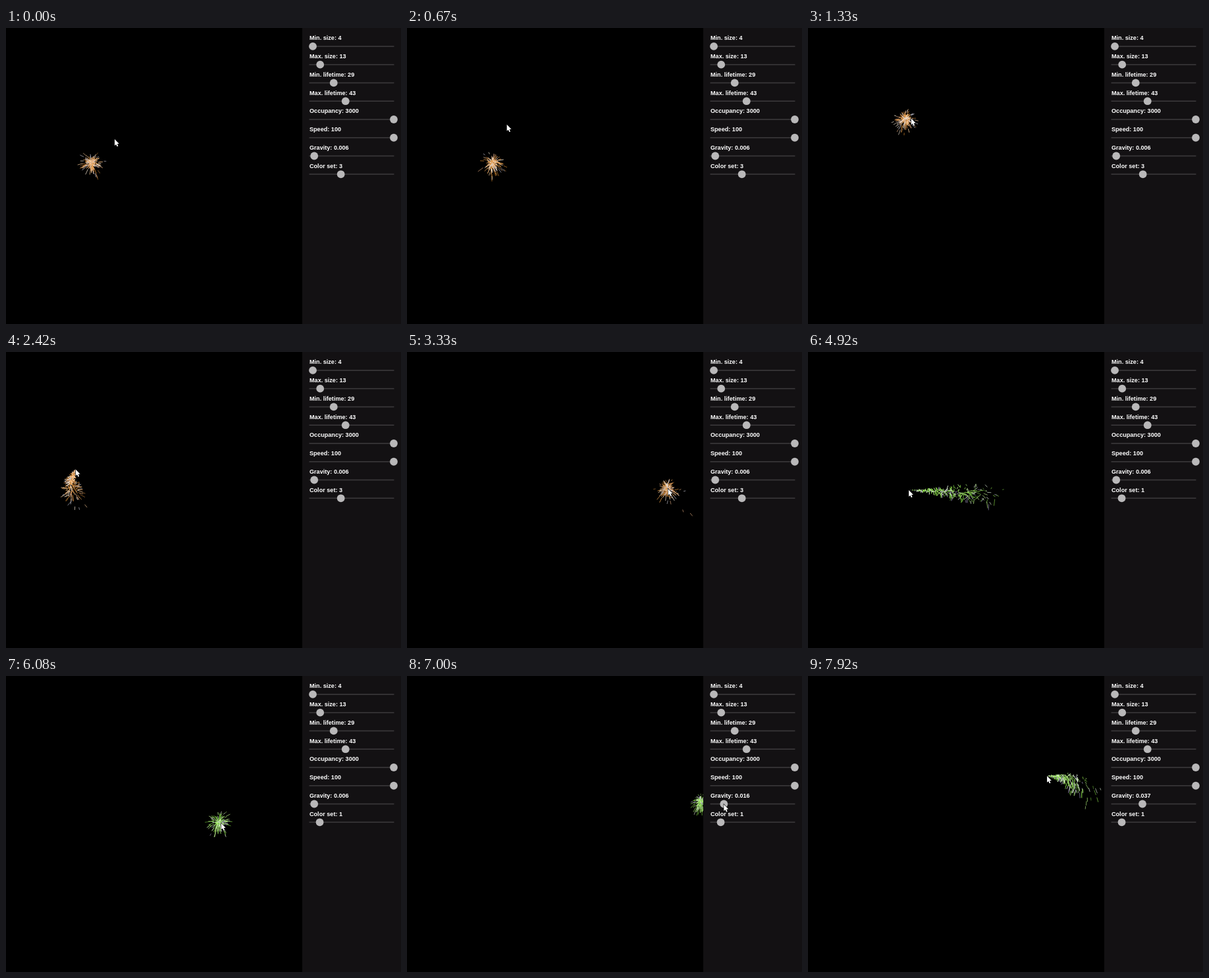
Recreate the animation shown at these times as an HTML page with a canvas. Size 600x450 px, loop 8 s.

```html
<!DOCTYPE html>
<html lang="en">
<head>
<meta charset="utf-8">
<title>Particle fountain</title>
<style>
html, body { margin: 0; width: 100%; height: 100%; overflow: hidden; background: #000; }
canvas { display: block; }
</style>
</head>
<body>
<canvas id="stage" width="600" height="450"></canvas>
<script>
const ctx = document.getElementById('stage').getContext('2d');
const LOOP = 8000;
const STEP = 1000 / 12;    // the picture refreshes 12 times a second
const TICK = 1 / 120;      // simulation step in seconds
const RATE = 7;            // particles born per tick
const LIFE = [29, 43];
const SIZE = [4, 13];
const SPEED = [0.25, 0.62];
const TRACK = { x: 460.5, width: 128.5 };

const WARM = ['#f0a550', '#ffcf9a', '#d98a2e', '#c9c9d6', '#fff0dc', '#b07434', '#eab183'];
const LIME = ['#8fe04a', '#b4f57c', '#6fb83a', '#e6f5de', '#9a90b8', '#c4fa92', '#7ccb42'];

const mix = (a, b, k) => a + (b - a) * k;

function rand(seed) {
  let h = Math.imul(seed ^ 0x9e3779b9, 0x85ebca6b);
  h = Math.imul(h ^ (h >>> 13), 0xc2b2ae35);
  h = Math.imul(h ^ (h >>> 16), 0x27d4eb2f);
  return ((h ^ (h >>> 15)) >>> 0) / 4294967296;
}

// The pointer's moves, chained: each runs until a time (s) to a point,
// bulging sideways by `bend` pixels on the way.
const moves = [];
let pen = { t: 0, x: 165, y: 169 };
function move(kind, t, x, y, bend = 0) {
  const to = { t, x, y };
  moves.push({ kind, from: pen, to, bend });
  pen = to;
}

move('hover', 0.9, 147, 139);
move('emit', 1.2, 149, 138);
move('emit', 1.7, 226, 132);
move('emit', 1.83, 292, 150);
move('emit', 2.04, 110, 224, -60);
move('emit', 2.42, 106, 178, -9);
move('emit', 2.75, 480, 190, -27);
move('emit', 2.95, 395, 208, -50);
move('emit', 3.33, 397, 208);
move('emit', 3.6, 398, 229);
move('hover', 3.95, 509, 223);
move('color', 4.25, 477, 223);
move('hover', 4.5, 310, 217);
move('emit', 4.917, 153, 210);
move('emit', 5.1, 70, 225);
move('emit', 5.42, 415, 200, 45);
move('emit', 5.66, 323, 222, 40);
move('emit', 5.98, 325, 223);
move('emit', 6.1, 336, 227);
move('emit', 6.55, 447, 190, -15);
move('hover', 6.7, 526, 186);
move('hover', 6.85, 468, 195);
move('gravity', 7.3, 508, 196);
move('hover', 7.42, 508, 196);
move('hover', 7.54, 432, 152);
move('emit', 7.95, 357, 152);

function follow({ from, to, bend }, t) {
  const u = Math.min(1, (t - from.t) / (to.t - from.t));
  const dx = to.x - from.x, dy = to.y - from.y;
  const side = bend * Math.sin(Math.PI * u) / (Math.hypot(dx, dy) || 1);
  return [from.x + dx * u - dy * side, from.y + dy * u + dx * side];
}

function stateAt(t) {
  const state = { cursor: [165, 169], emitter: [130, 205], gravity: 0.006, color: 3 };
  for (const stroke of moves) {
    if (t < stroke.from.t) break;
    const pos = follow(stroke, t);
    const value = (pos[0] - TRACK.x) / TRACK.width;
    state.cursor = pos;
    if (stroke.kind === 'emit') state.emitter = pos;
    if (stroke.kind === 'color') state.color = Math.round(value * 8);
    if (stroke.kind === 'gravity') state.gravity = value * 0.1;
  }
  return state;
}

function drawParticle([x, y], seed, age, gravity, colors) {
  const r = n => rand(seed * 8 + n);
  const life = mix(...LIFE, r(0));
  if (age > life) return;
  const angle = r(1) * Math.PI * 2;
  const speed = mix(...SPEED, r(2));
  const k = age / life;
  const length = mix(...SIZE, r(3)) * (1 - 0.3 * k);
  const fall = Math.hypot(speed, gravity * age);
  const pointAt = a => [
    x + Math.cos(angle) * speed * a,
    y + Math.sin(angle) * speed * a + gravity * a * a / 2,
  ];
  ctx.globalAlpha = 1 - 0.4 * k * k;
  ctx.strokeStyle = colors[Math.floor(r(4) * colors.length)];
  ctx.beginPath();
  ctx.moveTo(...pointAt(Math.max(0, age - length / fall)));
  ctx.lineTo(...pointAt(age));
  ctx.stroke();
}

function drawParticles(t, gravity) {
  const now = Math.floor(t / TICK);
  ctx.lineWidth = 1;
  for (let age = LIFE[1]; age >= 0; age--) {
    const birth = now - age;
    const { emitter, color } = stateAt(birth * TICK);
    const colors = color === 3 ? WARM : LIME;
    for (let i = 0; i < RATE; i++) {
      drawParticle(emitter, (birth + 100) * RATE + i, age + i / RATE, gravity, colors);
    }
  }
  ctx.globalAlpha = 1;
}

function drawPanel({ gravity, color }) {
  const rows = [
    ['Min. size: 4', 0.043],
    ['Max. size: 13', 0.13],
    ['Min. lifetime: 29', 0.29],
    ['Max. lifetime: 43', 0.43],
    ['Occupancy: 3000', 1],
    ['Speed: 100', 1],
    ['Gravity: ' + gravity.toFixed(3), gravity * 10],
    ['Color set: ' + color, color / 8],
  ];
  ctx.fillStyle = '#131113';
  ctx.fillRect(450, 0, 150, 450);
  ctx.font = 'bold 9.1px "Liberation Sans", Arial, sans-serif';
  rows.forEach(([label, value], i) => {
    const y = 27.9 + i * 27.77;
    ctx.fillStyle = '#fff';
    ctx.fillText(label, 461, y - 9.7);
    ctx.fillStyle = '#3b393b';
    ctx.fillRect(TRACK.x, y - 0.8, TRACK.width + 0.5, 1.6);
    ctx.fillStyle = '#b9b8b9';
    ctx.beginPath();
    ctx.arc(TRACK.x + value * TRACK.width, y, 5.9, 0, Math.PI * 2);
    ctx.fill();
  });
}

function drawCursor([x, y]) {
  ctx.save();
  ctx.translate(x, y);
  const arrow = new Path2D('M0 0V9.8L2.2 7.9 3.7 11.3 5.4 10.6 3.9 7.3 6.8 7Z');
  ctx.strokeStyle = '#000';
  ctx.lineWidth = 1.2;
  ctx.stroke(arrow);
  ctx.fillStyle = '#fff';
  ctx.fill(arrow);
  ctx.restore();
}

function draw(t) {
  const state = stateAt(t);
  ctx.fillStyle = '#000';
  ctx.fillRect(0, 0, 600, 450);
  drawParticles(t, state.gravity);
  drawPanel(state);
  drawCursor(state.cursor);
}

const start = performance.now();
function loop() {
  const ms = (performance.now() - start) % LOOP;
  draw(Math.floor(ms / STEP + 0.02) * STEP / 1000);
  requestAnimationFrame(loop);
}
loop();
</script>
</body>
</html>
```
